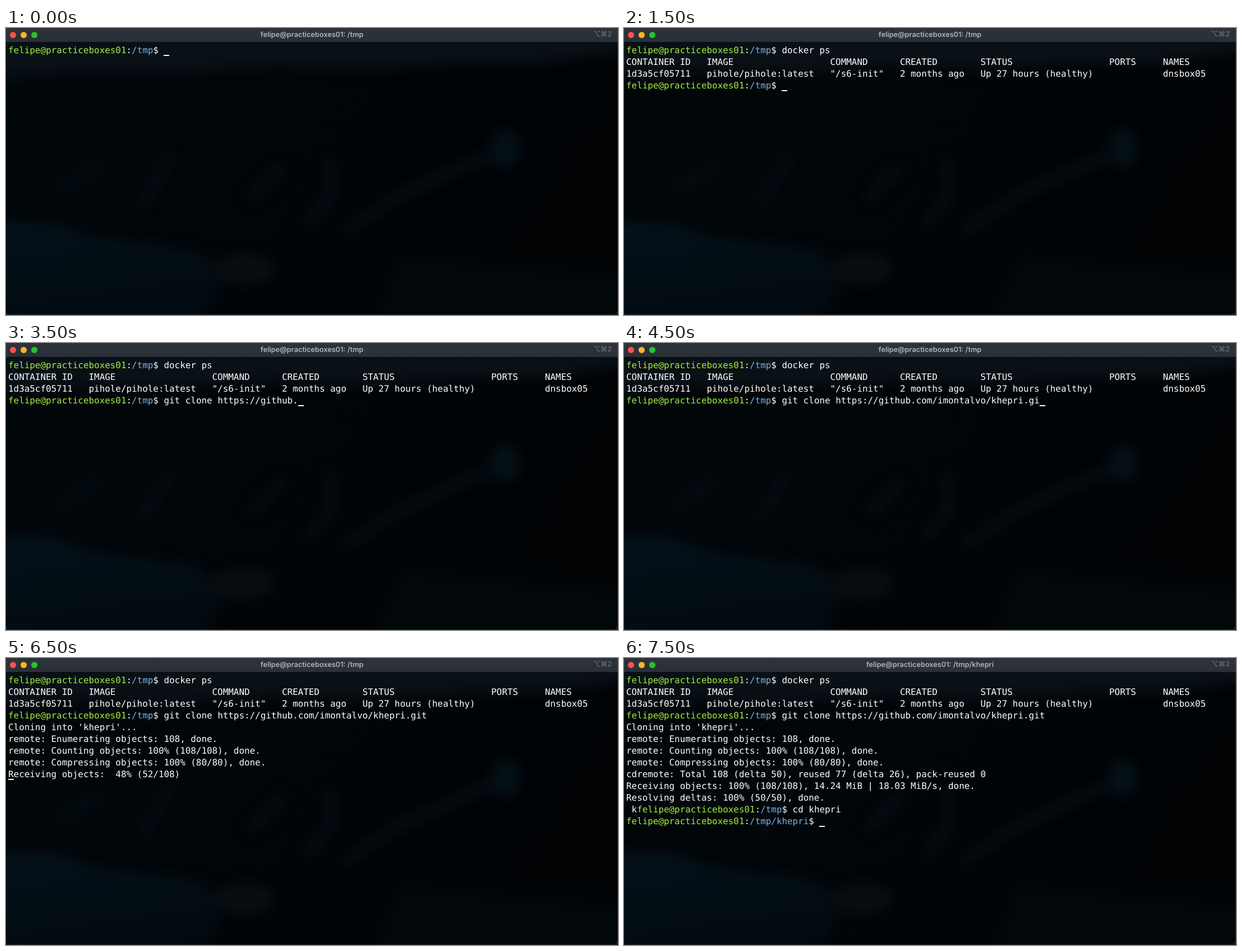
These frames come from a looping animation (1091x513 px, 8000 ms). An HTML page:

```html
<!DOCTYPE html>
<html lang="en">
<head>
<meta charset="utf-8">
<title>Terminal</title>
<style>
  html, body { margin: 0; width: 100%; height: 100%; overflow: hidden; background: #1a2024; }
  #window {
    position: relative; width: 1091px; height: 513px; overflow: hidden;
    border-radius: 0 0 8px 8px; background: #020509;
  }
  #window::after {
    content: ""; position: absolute; inset: 0; border-radius: inherit;
    box-shadow: inset -1px -1px 0 rgba(110, 122, 130, .3);
  }
  #scene { position: absolute; left: 0; top: 0; }
  #bar {
    position: absolute; left: 0; top: 0; width: 100%; height: 26px;
    background: linear-gradient(#2d3339, #293037);
    border-bottom: 1px solid #080b0e; box-sizing: border-box;
    font: 600 12.7px/25px Inter, sans-serif; text-rendering: geometricPrecision;
  }
  #title { text-align: center; color: #aeb5bb; }
  .light { position: absolute; top: 6.5px; width: 11px; height: 11px; border-radius: 50%; }
  #shortcut { position: absolute; right: 11px; top: -1px; color: #6a7178; font-weight: 500; }
  #screen {
    position: absolute; left: 4px; top: 29px; margin: 0; color: #fff;
    font: 15.9px/21px "DejaVu Sans Mono", monospace;
    text-rendering: geometricPrecision; font-variant-ligatures: none; white-space: pre;
  }
  #screen div { height: 21px; }
  b { font-weight: 400; color: #a0f03e; }
  u { text-decoration: none; color: #7db0df; }
  i { position: relative; }
  i::after {
    content: ""; position: absolute; left: 0; bottom: -1px;
    width: 10px; height: 2px; background: #fff;
  }
</style>
</head>
<body>
<div id="window">
  <svg id="scene" width="1091" height="513" viewBox="0 0 1091 513">
    <defs>
      <filter id="soft" x="-20%" y="-20%" width="140%" height="140%" color-interpolation-filters="sRGB">
        <feGaussianBlur stdDeviation="10"/>
      </filter>
      <linearGradient id="hill" x2="1" y2=".3">
        <stop offset="0" stop-color="#02070a"/>
        <stop offset=".5" stop-color="#010508"/>
        <stop offset="1" stop-color="#010305"/>
      </linearGradient>
      <linearGradient id="lake" x2=".3" y2="1">
        <stop offset="0" stop-color="#04121a"/>
        <stop offset="1" stop-color="#020a10"/>
      </linearGradient>
    </defs>
    <rect width="1091" height="513" fill="url(#hill)"/>
    <g filter="url(#soft)">
      <path d="M-30 0H1120V40L960 62L800 64L640 74L480 68L300 80L130 76L-30 92Z" fill="#091016"/>
      <path d="M-30 346L90 348L150 372L340 396L390 440L350 540H-30Z" fill="url(#lake)"/>
      <path d="M700 400L1120 440V540H640Z" fill="#02070a"/>
      <g fill="none" stroke="#050d13" stroke-width="18" stroke-linecap="round">
        <path d="M100 285L160 250M245 310L290 235"/>
        <path d="M440 300L490 250M575 240L580 300L540 345"/>
        <path d="M610 360L700 300L820 245L900 215"/>
      </g>
      <ellipse cx="890" cy="215" rx="26" ry="34" fill="#041018"/>
      <ellipse cx="425" cy="430" rx="55" ry="28" fill="#0a0d10"/>
    </g>
  </svg>
  <div id="bar">
    <span class="light" style="left:6.5px;background:#fe5148"></span>
    <span class="light" style="left:26px;background:#fdb529"></span>
    <span class="light" style="left:45px;background:#29c132"></span>
    <div id="title"></div>
    <span id="shortcut">⌥⌘2</span>
  </div>
  <div id="screen"></div>
</div>
<script>
const LOOP = 8000, STEP = 500;
const host = "felipe@practiceboxes01";
const clone = "git clone https://github.com/imontalvo/khepri.git";
const cursor = "<i></i>";

const titleEl = document.getElementById("title");
const screenEl = document.getElementById("screen");

const prompt = dir => `<b>${host}</b>:<u>${dir}</u>$ `;
const shell = text => prompt("/tmp") + text;
const row = cells => cells.map((c, k) => c.padEnd([15, 23, 13, 15, 24, 10, 0][k])).join("");
const progress = (label, done, total) => {
  const percent = String(Math.floor(done / total * 100)).padStart(3);
  return `${label}: ${percent}% (${done}/${total})`;
};

const table = [
  row(["CONTAINER ID", "IMAGE", "COMMAND", "CREATED", "STATUS", "PORTS", "NAMES"]),
  row(["1d3a5cf05711", "pihole/pihole:latest", '"/s6-init"', "2 months ago", "Up 27 hours (healthy)", "", "dnsbox05"])
];
const compressing = "remote: Compressing objects";
const receiving = "Receiving objects";

// Characters of the clone command on screen at each step
const typed = { 5: 3, 6: 14, 7: 25, 8: 37, 9: 48 };

function lines(step) {
  if (step < 2) return [shell("docker ps".slice(0, step * 6) + cursor)];
  const out = [shell("docker ps"), ...table];
  if (step < 10) return [...out, shell(clone.slice(0, typed[step] || 0) + cursor)];

  out.push(shell(clone), "Cloning into 'khepri'...");
  if (step === 10) return [...out, cursor];

  out.push("remote: Enumerating objects: 108, done.",
           progress("remote: Counting objects", 108, 108) + ", done.");
  if (step === 11) return [...out, cursor + progress(compressing, 19, 80)];

  out.push(progress(compressing, 80, 80) + ", done.");
  if (step < 14) return [...out, cursor + progress(receiving, step === 12 ? 22 : 52, 108)];

  out.push("cdremote: Total 108 (delta 50), reused 77 (delta 26), pack-reused 0",
           progress(receiving, 108, 108) + ", 14.24 MiB | 18.03 MiB/s, done.",
           progress("Resolving deltas", 50, 50) + ", done.");
  if (step === 14) return [...out, " k" + shell("cd khe" + cursor)];
  return [...out, " k" + shell("cd khepri"), prompt("/tmp/khepri") + cursor];
}

let shown = -1;
function draw(now) {
  const step = Math.floor(now % LOOP / STEP);
  if (step !== shown) {
    shown = step;
    titleEl.textContent = `${host}: /tmp${step === 15 ? "/khepri" : ""}`;
    screenEl.innerHTML = lines(step).map(line => `<div>${line}</div>`).join("");
  }
  requestAnimationFrame(draw);
}
draw(performance.now());
</script>
</body>
</html>
```
